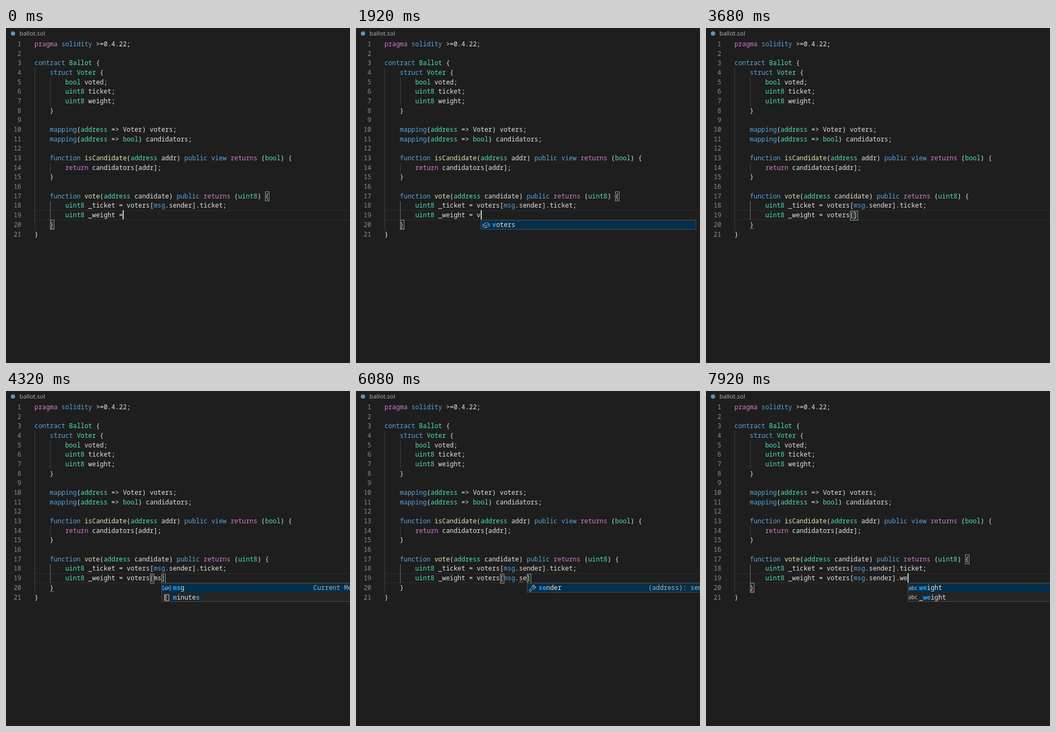
Animation, 640 px wide and 623 px high, one loop 8 s. Source, as an HTML page with a canvas:

```html
<!DOCTYPE html>
<html lang="en">
<head>
<meta charset="utf-8">
<title>ballot.sol</title>
<style>
html, body { margin: 0; width: 100%; height: 100%; overflow: hidden; background: #1e1e1e; }
canvas { display: block; }
</style>
</head>
<body>
<canvas id="stage" width="640" height="623"></canvas>
<script>
const ctx = document.getElementById('stage').getContext('2d');
const LOOP = 8000, LEFT = 53, CHAR = 7.15, LINE = 17.68, EDIT = 18;
const FACE = '11.917px "Noto Sans Mono", "DejaVu Sans Mono", monospace';
const MONO = '500 ' + FACE, BOLD = 'bold ' + FACE;
const PLAIN = '#e4e4e4', MATCH = '#18a3ff';

const source = `pragma solidity >=0.4.22;

contract Ballot {
    struct Voter {
        bool voted;
        uint8 ticket;
        uint8 weight;
    }

    mapping(address => Voter) voters;
    mapping(address => bool) candidators;

    function isCandidate(address addr) public view returns (bool) {
        return candidators[addr];
    }

    function vote(address candidate) public returns (uint8) {
        uint8 _ticket = voters[msg.sender].ticket;

    }
}`.split('\n');

const colors = {};
const paint = (color, words) => words.split(' ').forEach(w => colors[w] = color);
paint('#d67ad2', 'pragma return returns');
paint('#58a6e0', 'solidity contract struct mapping function public view msg');
paint('#4be2b5', 'bool uint8 address Ballot');
paint('#e8e8b0', 'isCandidate vote');

// Suggestion lists: a kind letter, then the label
const list = text => text.split(',');
const all = list('v abi,m addmod,u address,m assert,v block,u bool,u bytes,f candidators,u days,m ecrecover,u ether,u finney');
const voters = list('f voters');
const startM = list('u mapping,u memory,u minutes,u modifier,v msg,m mulmod,m addmod,m ripemd160');
const members = list('p data,p gas,p sender,p sig,p value');
const words = list('t weight,t _weight');
const details = {
  msg: 'Current Message',
  data: '(bytes): complete calldata',
  sender: '(address): sender of th'
};

// Time, text with the caret as |, open suggestions
const base = '        uint8 _weight =';
const steps = [
  [0, '|'], [1040, ' |'], [1280, ' |', all],
  [1920, ' v|', voters], [2160, ' vo|', voters], [2400, ' voters|'],
  [3120, ' voters[|]'], [3700, ' voters[m|]', startM],
  [3800, ' voters[ms|]', list('v msg,u minutes')],
  [4400, ' voters[msg|]', list('v msg')],
  [4800, ' voters[msg.|]'], [4960, ' voters[msg.|]', members],
  [5440, ' voters[msg.s|]', list('p sender,p sig')],
  [5560, ' voters[msg.se|]', list('p sender')],
  [6160, ' voters[msg.sender|]'], [6800, ' voters[msg.sender]|'],
  [7280, ' voters[msg.sender].|'], [7600, ' voters[msg.sender].w|', words],
  [7840, ' voters[msg.sender].we|', words]
];

const cube = 'M-6 -1L1 -5L6 -2V2L-1 5L-6 3ZM-6 -1L-1 1L6 -2M-1 1V5';
const icons = {
  f: ['#75beff', cube],
  m: ['#b180d7', cube],
  v: ['#75beff', 'M-5 -4H-7V4H-5M5 -4H7V4H5M-4 0L1 -3L4 -1V1L-1 3L-4 2ZM-4 0L-1 1L4 -1'],
  u: ['#d5d5d5', 'M-4 -5.5H4V5.5H-4ZM-4 -3H0M-4 0H1M-4 3H0'],
  p: ['#d5d5d5', 'M-6 4L0 -2C-1 -5 2 -7 4 -5L2 -3L3 -1L6 -3C7 0 4 2 2 1L-4 6Z']
};

const colX = col => LEFT + col * CHAR;
const rowY = row => 21.4 + row * LINE;
const baseline = row => 33.9 + row * LINE;

function rect(color, x, y, w, h) {
  ctx.fillStyle = color;
  ctx.fillRect(x, y, w, h);
}

function text(str, x, y, color, font = MONO, align = 'left') {
  ctx.font = font;
  ctx.textAlign = align;
  ctx.fillStyle = color;
  ctx.fillText(str, x, y);
}

function stroke(path, color) {
  ctx.strokeStyle = color;
  ctx.lineWidth = 1;
  ctx.stroke(new Path2D(path));
}

function drawCode(line, row) {
  let col = 0;
  for (const part of line.split(/(\w+)/)) {
    const isStruct = part === 'Voter' && line.includes('struct');
    const color = isStruct ? colors.bool : colors[part] || PLAIN;
    if (part.trim()) text(part, colX(col), baseline(row), color);
    col += part.length;
  }
}

function guide(col, from, to, color = '#404040') {
  rect(color, Math.round(colX(col)), rowY(from), 1, (to - from + 1) * LINE);
}

function bracketBox(col, row) {
  const x = Math.round(colX(col)) + 0.5, y = Math.round(rowY(row)) + 0.5;
  ctx.fillStyle = 'rgba(0,100,0,.1)';
  ctx.fillRect(x, y, 7, 17);
  ctx.strokeStyle = '#999';
  ctx.lineWidth = 1;
  ctx.strokeRect(x, y, 7, 17);
}

function squiggle(col, row) {
  stroke(`M${colX(col)} ${rowY(row) + 16.5}l2 -2l2 2l2 -2l1.5 1.5`, '#ff5050');
}

function drawIcon(kind, x, y) {
  if (kind === 't') {
    text('abc', x, y + 3, '#d5d5d5', '10px "Open Sans", sans-serif', 'center');
    return;
  }
  const [color, path] = icons[kind];
  ctx.save();
  ctx.translate(x, y);
  stroke(path, color);
  ctx.restore();
}

function drawLabel(label, typed, x, y) {
  let hit = 0;
  [...label].forEach((ch, i) => {
    const match = ch === typed[hit];
    if (match) hit++;
    text(ch, x + i * CHAR, y, match ? MATCH : PLAIN, match ? BOLD : MONO);
  });
}

function drawPopup(items, typed, x) {
  const left = Math.round(x), height = Math.round(items.length * LINE);
  rect('#252526', left, 357, 401, height);
  rect('#062f4a', left, 357, 401, LINE);
  ctx.strokeStyle = '#4a4a4a';
  ctx.lineWidth = 1;
  ctx.strokeRect(left + 0.5, 357.5, 400, height - 1);
  items.forEach((item, i) => {
    const [kind, label] = item.split(' ');
    const y = baseline(EDIT + 1 + i) + 0.3;
    drawIcon(kind, left + 10, y - 3.5);
    drawLabel(label, typed, left + 21.5, y);
    if (!i && details[label]) text(details[label], left + 390, y, '#aab4ba', MONO, 'right');
  });
}

function draw(t) {
  const [since, typed, items] = steps.findLast(s => s[0] <= t);
  const caret = base.length + typed.indexOf('|');
  const line = base + typed.replace('|', '');
  const x = colX(caret);

  rect('#1e1e1e', 0, 0, 640, 623);
  ctx.fillStyle = '#519aba';
  ctx.beginPath();
  ctx.arc(13, 10.3, 4, 0, 7);
  ctx.fill();
  text('ballot.sol', 25, 14.4, '#b4b4b4', '11.3px "Open Sans", "Noto Sans", sans-serif');

  rect('#2d2d2d', LEFT, 339, 587, 1);
  rect('#2d2d2d', LEFT, 356, 587, 1);
  guide(0, 3, 19);
  guide(4, 4, 6);
  guide(4, 13, 13);
  guide(4, 17, 18, '#707070');

  const open = line.indexOf('['), close = line.indexOf(']');
  const nearBracket = /[[\]]/.test(line.slice(caret - 1, caret + 1));
  if (nearBracket) {
    bracketBox(open, EDIT);
    bracketBox(close, EDIT);
  } else {
    bracketBox(60, 16);
    bracketBox(4, 19);
  }

  source.forEach((code, row) => {
    text(row + 1, 28.5, baseline(row), '#8c8c8c', MONO, 'right');
    drawCode(row === EDIT ? line : code, row);
  });

  if (t >= 5500 && t < 6800) squiggle(35, EDIT);
  else squiggle(4, 19);

  if ((t - since) % 1000 < 500) rect('#d0d0cc', Math.round(x), 339, 2, 17);
  if (items) drawPopup(items, line.slice(0, caret).match(/\w*$/)[0], x);
}

const start = performance.now();
function tick() {
  draw((performance.now() - start) % LOOP);
  requestAnimationFrame(tick);
}
tick();
</script>
</body>
</html>
```
